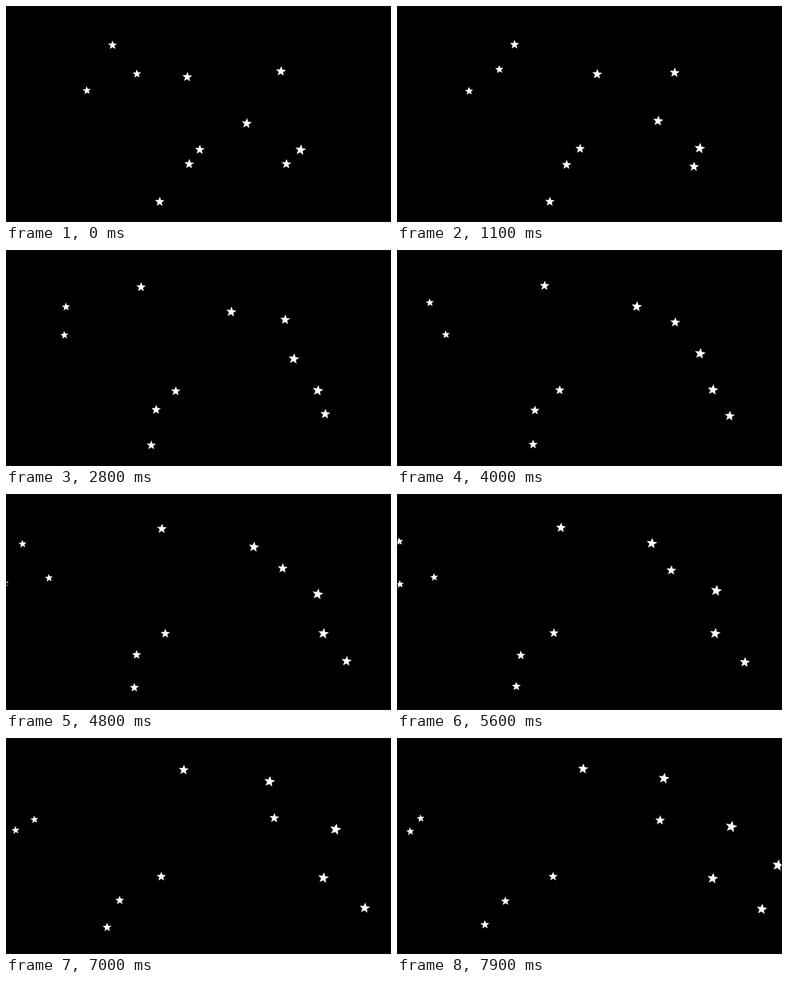
An HTML page that plays this animation: 600 by 338 pixels, repeating every 8000 ms.

```html
<!DOCTYPE html>
<html lang="en">
<head>
<meta charset="utf-8">
<title>Drifting stars</title>
<style>
  html, body { margin: 0; width: 100%; height: 100%; overflow: hidden; background: #000; }
  svg { display: block; width: 100vw; height: 100vh; }
</style>
</head>
<body>
<svg id="sky" viewBox="0 0 600 338">
  <rect width="600" height="338" fill="#000"/>
  <g id="stars" fill="#fff"></g>
  <rect x=".5" y=".5" width="599" height="337" fill="none" stroke="#0c0c0c"/>
</svg>
<script>
const LOOP = 8000, STEP = 100;
const KNOTS = [0, 2.8, 5.6, 7.9]; // seconds

// x and y at each knot, then the radius at the start and the end
const STARS = [
  { x: [166, 210.5, 255.5, 290], y: [61, 57.8, 52.5, 48], r: [7.4, 8.4] },
  { x: [126, 91, 58, 37], y: [132, 133, 130, 125.5], r: [6.7, 6.4] },
  { x: [204, 93.5, 3.5, -40], y: [106, 88.8, 74, 64], r: [7, 6.3] },
  { x: [282.5, 351, 397, 416], y: [110.8, 96.5, 77, 63], r: [8, 9] },
  { x: [428.5, 435, 427.5, 410], y: [102, 108.8, 119.2, 128.5], r: [8.2, 8] },
  { x: [375, 448.5, 497.5, 521], y: [183.5, 170, 151, 138.5], r: [8.3, 9.5] },
  { x: [459, 486, 495.8, 492], y: [225, 219.6, 218, 219.5], r: [8.8, 8.8] },
  { x: [437, 497.5, 542, 568.5], y: [247, 256.4, 263, 267.5], r: [7.9, 8.7] },
  { x: [302, 264.5, 244.5, 243.3], y: [224.5, 220.6, 217.4, 216.5], r: [7.9, 7.5] },
  { x: [285.5, 234, 193, 169], y: [247, 249.7, 252.2, 255], r: [8, 7.2] },
  { x: [239.5, 226.5, 186, 137], y: [306, 305.2, 300.8, 291.8], r: [7.8, 7.2] },
  { x: [-51.5, -20.7, 4.7, 20.7], y: [129, 135, 141, 146], r: [6.5, 6.5] },
  { x: [722, 676, 630, 593.7], y: [140, 161, 182, 199], r: [9.4, 9.4] }
];

const starPoints = Array.from({ length: 10 }, (_, i) => {
  const angle = (i * 36 - 90) * Math.PI / 180;
  const radius = i % 2 ? 0.43 : 1;
  return `${radius * Math.cos(angle)},${radius * Math.sin(angle)}`;
}).join(" ");

const group = document.getElementById("stars");
for (const star of STARS) {
  star.node = document.createElementNS("http://www.w3.org/2000/svg", "polygon");
  star.node.setAttribute("points", starPoints);
  group.append(star.node);
}

// Cubic through the four knots
function curve(values, t) {
  return values.reduce((sum, value, i) => sum + KNOTS.reduce(
    (product, knot, j) => j === i ? product : product * (t - knot) / (KNOTS[i] - knot), value), 0);
}

function draw(ms) {
  const t = ms / 1000;
  for (const { x, y, r, node } of STARS) {
    const radius = r[0] + (r[1] - r[0]) * ms / LOOP;
    const tilt = (radius - 7.5) * 6; // nearer stars lean further
    node.setAttribute("transform",
      `translate(${curve(x, t)} ${curve(y, t) + 0.3}) rotate(${tilt}) scale(${radius})`);
  }
}

const start = performance.now();
function tick() {
  const elapsed = (performance.now() - start) % LOOP;
  draw(Math.floor(elapsed / STEP) * STEP);
  requestAnimationFrame(tick);
}
tick();
</script>
</body>
</html>
```
